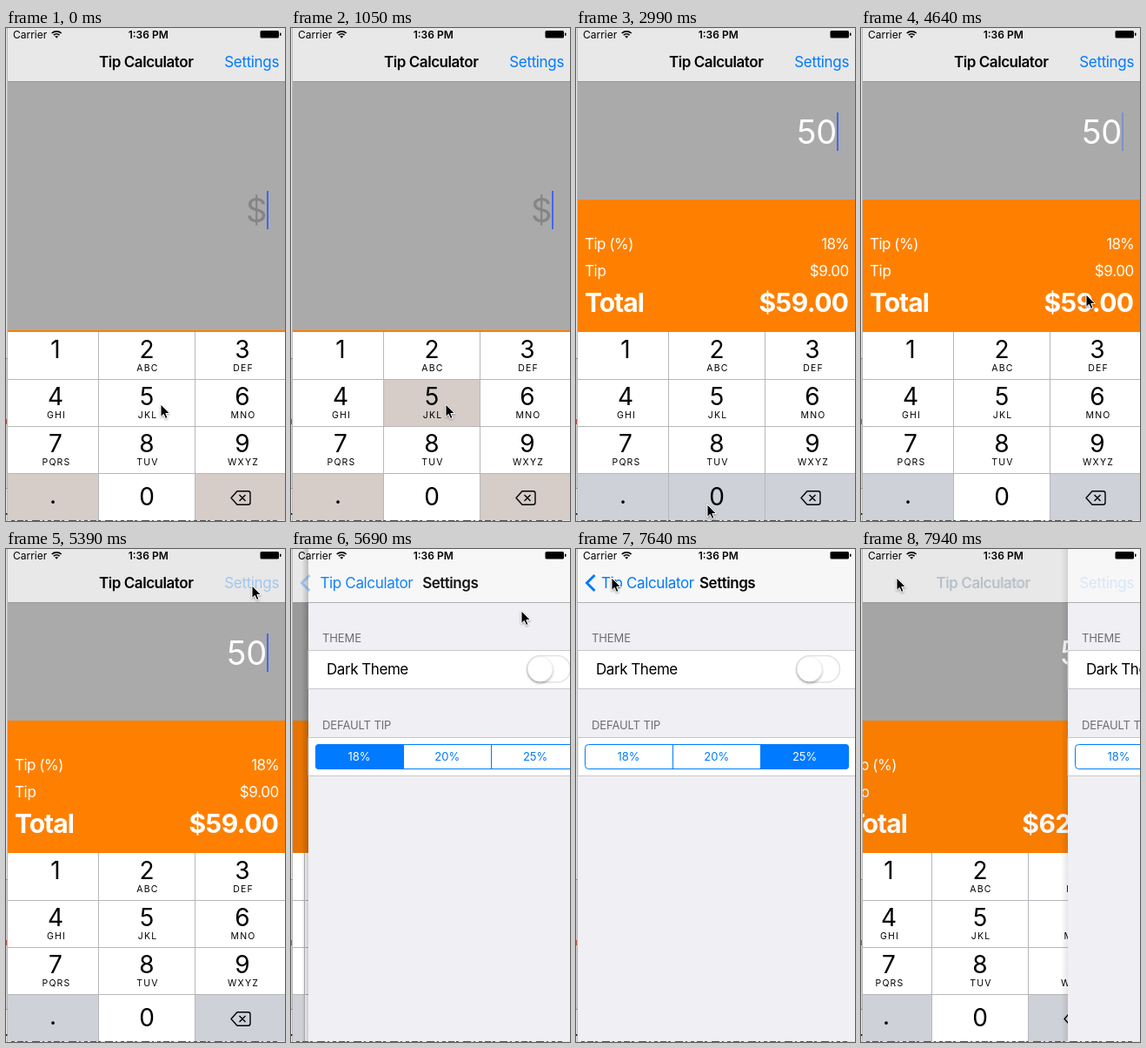
An HTML page for the animation above (8 s loop, 321 by 566 pixels).

```html
<!DOCTYPE html>
<html lang="en">
<head>
<meta charset="utf-8">
<title>Tip Calculator</title>
<style>
  html, body { margin: 0; width: 321px; height: 566px; overflow: hidden; background: #fff; }
  svg { display: block; }
  text { font-family: Inter, Roboto, sans-serif; font-size: 17px; letter-spacing: -.35px; white-space: pre; }
  .end { text-anchor: end; }
  .mid { text-anchor: middle; }
  .status { font-size: 12px; letter-spacing: 0; }
  .bold { font-weight: 600; }
  .title { font-weight: 600; letter-spacing: -.45px; }
  .blue { fill: #007aff; }
  .panel text { fill: #fff; }
  .panel .total { font-size: 30px; font-weight: 700; letter-spacing: -.6px; }
  .amount { font-size: 38px; letter-spacing: -.3px; }
  .digit { font-size: 28px; letter-spacing: 0; text-anchor: middle; }
  .letters { font-size: 10.5px; letter-spacing: 1.2px; text-anchor: middle; }
  .head { font-size: 13px; letter-spacing: -.1px; fill: #6d6d72; }
  .seg { font-size: 13px; letter-spacing: 0; text-anchor: middle; }
</style>
</head>
<body>
<svg width="321" height="566" viewBox="0 0 321 566">
  <defs>
    <clipPath id="phone"><rect x="2" width="319" height="565"/></clipPath>
    <clipPath id="pill"><rect x="10" y="224" width="304" height="29" rx="4"/></clipPath>
    <linearGradient id="edge">
      <stop offset="0" stop-opacity="0"/>
      <stop offset="1" stop-opacity=".2"/>
    </linearGradient>
    <filter id="soft" x="-30%" y="-30%" width="160%" height="170%">
      <feDropShadow dx="0" dy="2" stdDeviation="1.5" flood-opacity=".3"/>
    </filter>
    <filter id="drop" x="-30%" y="-30%" width="180%" height="180%">
      <feDropShadow dx="0" dy="1" stdDeviation=".8" flood-opacity=".4"/>
    </filter>
  </defs>

  <!-- page behind the phone -->
  <rect width="321" height="566" fill="#e4e4e4"/>
  <rect y="380" width="2" height="149" fill="#cfcfd2"/>
  <rect y="379" width="2" height="1" fill="#888"/>
  <rect y="449" width="1" height="6" fill="#c0503c"/>
  <rect y="528" width="2" height="1" fill="#888"/>
  <rect y="557" width="2" height="2" fill="#222"/>
  <rect x="1" width="1" height="566" fill="#a8a8a8" opacity=".7"/>
  <path d="M6 565.5H312" stroke="#555" stroke-dasharray="4 3 7 2 3 5 9 3 2 4"/>

  <g clip-path="url(#phone)">
    <g id="main">
      <rect x="2" width="320" height="566" fill="#aaa"/>
      <rect x="2" width="320" height="61" fill="#e8e8e8"/>
      <rect x="2" y="61" width="320" height="1" fill="#989898"/>
      <g id="entry">
        <text id="amount" class="amount end" x="300" y="133"></text>
        <rect id="caret" x="300" y="97" width="2" height="44" fill="#4166f5"/>
      </g>
      <g id="panel" class="panel">
        <rect x="2" y="197" width="320" height="220" fill="#ff8000"/>
        <text x="10" y="253.500" style="letter-spacing:-.5px">Tip (%)</text>
        <text id="rate" class="end" x="314" y="253.500" style="letter-spacing:-.8px"></text>
        <text x="10" y="284.500">Tip</text>
        <text id="tip" class="end" x="314" y="284.500"></text>
        <text class="total" x="10" y="325.500" style="letter-spacing:-1px">Total</text>
        <text id="total" class="total end" x="313.500" y="325.500"></text>
      </g>
      <rect id="dim" x="2" y="62" width="320" height="287"/>
      <g id="keys"><rect x="2" y="349" width="320" height="217" fill="#b6b7ba"/></g>
      <path d="M259 539.500L266 531.800H278.500Q281 531.800 281 534.300V544.700Q281 547.200 278.500 547.200H266Z
               M268.500 536L275.500 543M275.500 536L268.500 543" fill="none" stroke="#000" stroke-width="1.400" stroke-linejoin="round"/>
    </g>

    <g id="settings">
      <rect id="shade" x="-6" width="8" height="566" fill="url(#edge)"/>
      <rect x="2" width="320" height="566" fill="#efeff4"/>
      <rect x="2" width="320" height="61" fill="#f7f7f8"/>
      <rect x="2" y="61" width="320" height="1" fill="#b2b2b4"/>
      <text class="head" x="18" y="106.500">THEME</text>
      <rect x="2" y="116.500" width="322" height="44" fill="#fff" stroke="#c8c7cc"/>
      <text x="23" y="144" style="letter-spacing:-.45px">Dark Theme</text>
      <rect x="253.500" y="122.500" width="50" height="30.500" rx="15.250" fill="#fff" stroke="#e2e2e2" stroke-width="1.500"/>
      <circle cx="268.700" cy="137.800" r="14.300" fill="#fff" stroke="#ddd" stroke-width=".5" filter="url(#soft)"/>
      <text class="head" x="18" y="206.500">DEFAULT TIP</text>
      <rect x="2" y="216.500" width="322" height="44" fill="#fff" stroke="#c8c7cc"/>
      <g id="segments" clip-path="url(#pill)"></g>
      <rect x="10.500" y="224.500" width="303" height="28" rx="4" fill="none" stroke="#007aff"/>
    </g>

    <!-- navigation bar -->
    <path id="chevron" d="M21.500 30L12.500 39L21.500 48" fill="none" stroke="#007aff" stroke-width="3"/>
    <text id="back" class="blue" x="29" y="45">Tip Calculator</text>
    <text id="homeTitle" class="title" x="29" y="45">Tip Calculator</text>
    <text id="setTitle" class="title" x="142" y="45">Settings</text>
    <text id="setButton" class="blue end" x="314" y="45">Settings</text>

    <!-- status bar -->
    <text class="status" x="8" y="11.500">Carrier</text>
    <path d="M52.700 6A8 8 0 0 1 63.700 6M54.800 8.200A5 5 0 0 1 61.600 8.200" fill="none" stroke="#000" stroke-width="1.700"/>
    <path d="M56.200 9.600Q58.200 8.200 60.200 9.600L58.200 11.700Z"/>
    <text class="status bold mid" x="163.700" y="11.500">1:36 PM</text>
    <rect x="292.500" y="3" width="21.500" height="8.500" rx="1.500"/>
    <rect x="315" y="5.500" width="1.500" height="3.500" rx=".7"/>
  </g>

  <path id="pointer" d="M0 0V14.500L3.300 11.400L5.600 16.500L8 15.500L5.800 10.500H10.500Z" stroke="#fff" stroke-width="1" filter="url(#drop)"/>
</svg>
<script>
const LOOP = 8000, WIDTH = 320;
const PUSH = 5439, POP = 7796, CHOOSE = 6740;
const $ = id => document.getElementById(id);

function add(parent, tag, attrs, text = '') {
  const el = document.createElementNS('http://www.w3.org/2000/svg', tag);
  for (const name in attrs) el.setAttribute(name, attrs[name]);
  el.textContent = text;
  return parent.appendChild(el);
}

// keypad
const cols = [[2, 104, 57], [107, 110, 162], [218, 104, 272]];
const rows = [[349, 54], [404, 53], [458, 53], [512, 53]];
const labels = ['1', '2 ABC', '3 DEF', '4 GHI', '5 JKL', '6 MNO', '7 PQRS', '8 TUV', '9 WXYZ', '.', '0', ''];
const keys = labels.map((label, i) => {
  const [x, width, mid] = cols[i % 3], row = Math.floor(i / 3), [y, height] = rows[row];
  const [digit, letters] = label.split(' ');
  const rect = add($('keys'), 'rect', { x, y, width, height, fill: '#fff' });
  const dot = digit === '.';
  add($('keys'), 'text', { class: 'digit', x: dot ? 54 : mid, y: row === 3 ? 548 - dot * 2 : 379 + row * 54 }, digit);
  if (letters) add($('keys'), 'text', { class: 'letters', x: mid + 1, y: 394 + row * 54 }, letters);
  return rect;
});

// tip choices
const rates = [18, 20, 25];
const segments = rates.map((rate, i) => {
  const x = 10 + i * 101;
  const rect = add($('segments'), 'rect', { x, y: 223, width: 102, height: 30 });
  const text = add($('segments'), 'text', { class: 'seg', x: 60.5 + i * 101.3, y: 242.7 }, rate + '%');
  if (i) add($('segments'), 'rect', { x, y: 223, width: 1, height: 30, fill: '#007aff' });
  return { rect, text };
});

// [ms, x, y]
const pointerPath = [
  [1050, 178, 432], [1200, 178, 434], [1500, 168, 519], [1800, 162, 530], [1950, 162, 530],
  [2240, 151, 547], [3140, 151, 547], [3290, 171, 529], [3440, 171, 529], [3740, 187, 518],
  [4040, 187, 518], [4340, 208, 455], [4640, 259, 306], [4940, 277, 60], [5090, 283, 42],
  [5390, 283, 42], [5690, 265, 71], [5990, 226, 212], [6290, 251, 241], [6890, 251, 241],
  [7190, 165, 130], [7490, 40, 4], [7640, 41, 33]
];
const panelPath = [[1050, 0], [1200, .45], [1350, .92], [1500, 1]];
const caretPath = [[0, 1], [150, .4], [300, 0], [750, 1], [2100, .4], [2240, 0], [2690, 1],
  [3590, .4], [3740, 0], [4040, 1], [4640, .4], [4790, 0], [5090, 1]];

function glide(path, t) {
  const i = path.findIndex(p => p[0] > t);
  if (i === 0) return path[0].slice(1);
  if (i < 0) return path[path.length - 1].slice(1);
  const a = path[i - 1], b = path[i], k = (t - a[0]) / (b[0] - a[0]);
  return a.slice(1).map((v, n) => v + (b[n + 1] - v) * k);
}
const hold = (path, t) => path.filter(p => p[0] <= t).pop()[1];
const within = (t, from, to) => t >= from && t < to;
const clamp = v => Math.max(0, Math.min(1, v));
const move = (id, x, y = 0) => $(id).setAttribute('transform', `translate(${x} ${y})`);
const fade = (id, v) => $(id).setAttribute('opacity', clamp(v));
const money = v => '$' + v.toFixed(2);

// remaining share of a critically damped slide
function spring(ms) {
  const k = Math.max(0, ms) * .01826;
  return Math.exp(-k) * (1 + k);
}

const tick = t => t < 2240 ? Math.floor(t / 150) * 150 : 2240 + Math.floor((t - 2240) / 150) * 150;

function drawCalculator(t) {
  const value = t < 1200 ? 0 : t < 2990 ? 5 : 50;
  const rate = t < CHOOSE ? 18 : 25;
  const tip = value * rate / 100;
  const [up] = glide(panelPath, t);
  $('amount').textContent = value || '$';
  $('amount').setAttribute('fill', value ? '#fff' : '#858588');
  $('rate').textContent = rate + '%';
  $('tip').textContent = money(tip);
  $('total').textContent = money(value + tip);
  move('entry', 0, Math.round(90 * (1 - up)));
  move('panel', 0, Math.round(150 * (1 - up)));
  fade('caret', t > PUSH ? 0 : hold(caretPath, t));

  const tint = [[214, 204, 200], [206, 209, 215]];
  const side = `rgb(${tint[0].map((c, i) => Math.round(c + (tint[1][i] - c) * up))})`;
  keys[9].setAttribute('fill', side);
  keys[11].setAttribute('fill', side);
  keys[4].setAttribute('fill', within(t, 1050, 1350) ? side : '#fff');
  keys[10].setAttribute('fill', within(t, 2840, 3140) ? side : '#fff');
}

function drawSettings(t) {
  const chosen = t < CHOOSE ? 0 : 2;
  segments.forEach(({ rect, text }, i) => {
    const fading = i === 0 && within(t, CHOOSE, CHOOSE + 150);
    rect.setAttribute('fill', i === chosen ? '#007aff' : fading ? '#f4f8ff' : '#fff');
    text.setAttribute('fill', i === chosen ? '#fff' : '#007aff');
  });
}

function drawSlide(t) {
  const away = t < PUSH ? 1 : t < POP ? spring(t - PUSH) : 1 - spring(t - POP);
  move('settings', Math.round(WIDTH * away));
  move('main', Math.round(-96 * (1 - away)));
  fade('dim', .1 * (1 - away));
  fade('shade', away < 1 ? .3 + .7 * (1 - away) : 0);

  const homeIn = (away - .7) / .3;
  const backTap = within(t, 7790, POP) ? .3 : 1;
  move('back', 78 * away);
  move('homeTitle', 78 * away);
  move('setTitle', 160 * away);
  fade('back', (1 - 1.2 * away) * backTap);
  fade('chevron', (1 - 12 * away) * backTap);
  fade('homeTitle', homeIn);
  fade('setTitle', 1 - 1.5 * away);
  fade('setButton', within(t, 5240, PUSH) ? .3 : homeIn);
}

function frame() {
  const t = tick(performance.now() % LOOP);
  drawCalculator(t);
  drawSettings(t);
  drawSlide(t);
  move('pointer', ...glide(pointerPath, t));
  requestAnimationFrame(frame);
}
frame();
</script>
</body>
</html>
```
